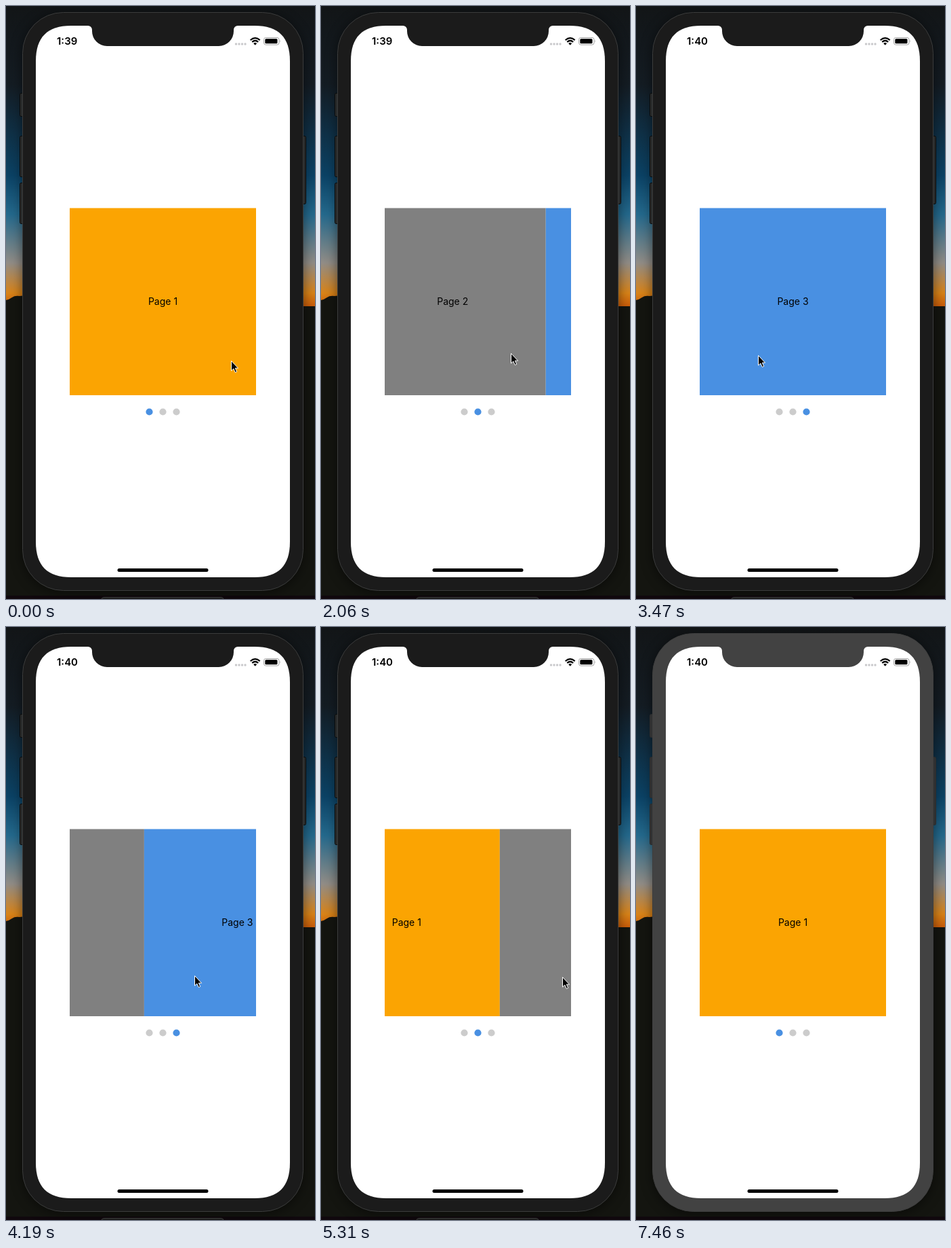
An HTML page that plays this animation: 456x873 px, repeating every 7.55 s.

```html
<!DOCTYPE html>
<html lang="en">
<head>
<meta charset="utf-8">
<title>Pager</title>
<style>
  html, body { margin: 0; width: 100%; height: 100%; overflow: hidden; background: #11130f; }
  svg { display: block; width: 456px; height: 873px; }
  text { font-family: Inter, "Liberation Sans", sans-serif; fill: #000; }
  .page { font-size: 14px; text-anchor: middle; }
  #clock { font-size: 15px; font-weight: 600; }
  #body { fill: #1b1b1b; stroke: #3b3c3c; }
  #notch { fill: #1b1b1b; }
  #keys rect { fill: #282a2a; stroke: #0a0b0b; }
  .idle #body { fill: #424242; stroke: #3e3e3e; }
  .idle #notch { fill: #424242; }
  .idle #keys rect { fill: #303132; stroke: #2b2c2d; }
  .idle #tab { display: none; }
</style>
</head>
<body>
<svg id="stage" viewBox="0 0 456 873">
  <defs>
    <linearGradient id="sky" x2="0" y2="445" gradientUnits="userSpaceOnUse">
      <stop offset="0" stop-color="#121517"/>
      <stop offset=".26" stop-color="#141c23"/>
      <stop offset=".56" stop-color="#0b4265"/>
      <stop offset=".69" stop-color="#24698c"/>
      <stop offset=".85" stop-color="#918c86"/>
      <stop offset=".95" stop-color="#d88318"/>
      <stop offset="1" stop-color="#c85606"/>
    </linearGradient>
    <filter id="blur" x="-20%" y="-20%" width="140%" height="140%">
      <feGaussianBlur stdDeviation="9"/>
    </filter>
    <clipPath id="card"><rect x="94" y="297.600" width="275" height="275.400"/></clipPath>
  </defs>

  <rect width="456" height="445" fill="url(#sky)"/>
  <path d="M0 433Q5 432 9 429T20 427L30 426V442H456V873H0Z" fill="#141510"/>
  <rect y="868" width="456" height="5" fill="#10080d"/>
  <rect x="24" y="12" width="415" height="851" rx="60" opacity=".5" filter="url(#blur)"/>
  <path id="tab" d="M141 873Q141.500 870.500 145 870.500H317Q320.500 870.500 321 873" fill="#1b1b1b" stroke="#3b3c3c"/>

  <g id="keys">
    <rect x="20.500" y="128.500" width="8" height="34" rx="2"/>
    <rect x="20.500" y="191.500" width="8" height="60" rx="2"/>
    <rect x="20.500" y="260.500" width="8" height="60" rx="2"/>
    <rect x="434.500" y="191.500" width="8" height="100" rx="2"/>
  </g>
  <rect id="body" x="24.500" y="9.500" width="414" height="851" rx="60"/>
  <path d="M44 81C44 46 61 29 96 29H367C402 29 419 46 419 81V789C419 824 402 841 367 841H96C61 841 44 824 44 789Z" fill="#fff"/>
  <path id="notch" d="M121 28V29A6 6 0 0 1 127 35V37A22 22 0 0 0 149 59H314A22 22 0 0 0 336 37V35A6 6 0 0 1 342 29V28Z"/>

  <text id="clock" x="75" y="57">1:39</text>
  <g id="signal" fill="#c9c9cb"></g>
  <g fill="none" stroke="#000" stroke-width="2.200">
    <path d="M360.700 50.300Q367.700 44 374.700 50.300"/>
    <path d="M363.200 53Q367.700 49 372.200 53"/>
  </g>
  <path d="M365.200 55.100Q367.700 53.100 370.200 55.100L367.700 57.700Z"/>
  <rect x="380.500" y="46.500" width="22.500" height="10.600" rx="3" fill="none" stroke="#a5a5a5"/>
  <rect x="382.300" y="48.300" width="18.200" height="7" rx="1.500"/>
  <path d="M404 50Q405.600 51.800 404 53.600Z" fill="#a5a5a5"/>

  <g clip-path="url(#card)"><g id="strip"></g></g>
  <g id="dots"></g>
  <rect x="164.500" y="828" width="134" height="5" rx="2.500"/>
  <path id="cursor" d="M.5 .5V15L3.800 12L6.300 17.500L8.700 16.400L6.300 11.200H10.600Z" stroke="#fff"/>
</svg>
<script>
const LOOP = 7550, TICKS = 85, WIDTH = 275;
const BLUE = '#4990e2', GREY = '#ccc';
const $ = id => document.getElementById(id);

const SWIPES = [
  { start: 11, dir: 1, tau: 2.62 },
  { start: 22, dir: 1, tau: 2.62 },
  { start: 45, dir: -1, tau: 2.8 },
  { start: 58, dir: -1, tau: 2.04 }
];

// pointer moves: start, end, x, y
const HOME = [332, 522];
const MOVES = [
  [0, 7, 326, 512],
  [11, 14, 164, 505], [14, 17, 326, 512],
  [22, 25, 150, 507], [25, 29, 288, 512], [29, 32, 315, 512],
  [33, 36, 133, 510], [37, 40, 196, 515], [41, 43, 175, 514],
  [45, 48, 314, 512], [48, 57, 162, 514],
  [58, 60, 356, 515], [60, 63, 345, 516],
  [68, 74, 390, 900]
];

function make(tag, parent, attrs, label = '') {
  const el = document.createElementNS('http://www.w3.org/2000/svg', tag);
  for (const name in attrs) el.setAttribute(name, attrs[name]);
  el.textContent = label;
  return parent.appendChild(el);
}

const move = (el, x, y) => el.setAttribute('transform', `translate(${x} ${y})`);
const clamp = u => Math.max(0, Math.min(1, u));
const smooth = u => u * u * (3 - 2 * u);

function pointer(k) {
  let [x, y] = HOME;
  for (const [start, end, toX, toY] of MOVES) {
    const u = smooth(clamp((k - start) / (end - start)));
    x += (toX - x) * u;
    y += (toY - y) * u;
  }
  return [Math.round(x), Math.round(y)];
}

// each swipe speeds up under the finger, then glides to rest
function pageAt(k) {
  return SWIPES.reduce((page, { start, dir, tau }) => {
    const n = Math.max(0, k - start) / tau;
    return page + dir * (1 - Math.exp(-n * n));
  }, 0);
}

['#fba402', '#808080', BLUE].forEach((fill, i) => {
  const x = 94 + i * WIDTH;
  make('rect', $('strip'), { x, y: 297, width: WIDTH, height: WIDTH + 1, fill });
  make('text', $('strip'), { class: 'page', x: x + WIDTH / 2, y: 440 }, `Page ${i + 1}`);
  make('circle', $('dots'), { cx: 211.5 + i * 20, cy: 597.5, r: 5.1 });
});
for (let i = 0; i < 4; i++) make('circle', $('signal'), { cx: 339.5 + i * 4.5, cy: 56, r: 1.7 });

function draw(ms) {
  const k = Math.min(TICKS - 1, Math.floor(ms / LOOP * TICKS + .25));
  // the indicator trails the scroll slightly
  const active = Math.round(pageAt(k - .4));
  move($('strip'), -pageAt(k) * WIDTH, 0);
  move($('cursor'), ...pointer(k));
  [...$('dots').children].forEach((dot, i) => dot.setAttribute('fill', i === active ? BLUE : GREY));
  $('clock').textContent = k < 26 ? '1:39' : '1:40';
  $('stage').classList.toggle('idle', k === TICKS - 1);
}

const begin = performance.now();
function tick() {
  draw((performance.now() - begin) % LOOP);
  requestAnimationFrame(tick);
}
tick();
</script>
</body>
</html>
```
